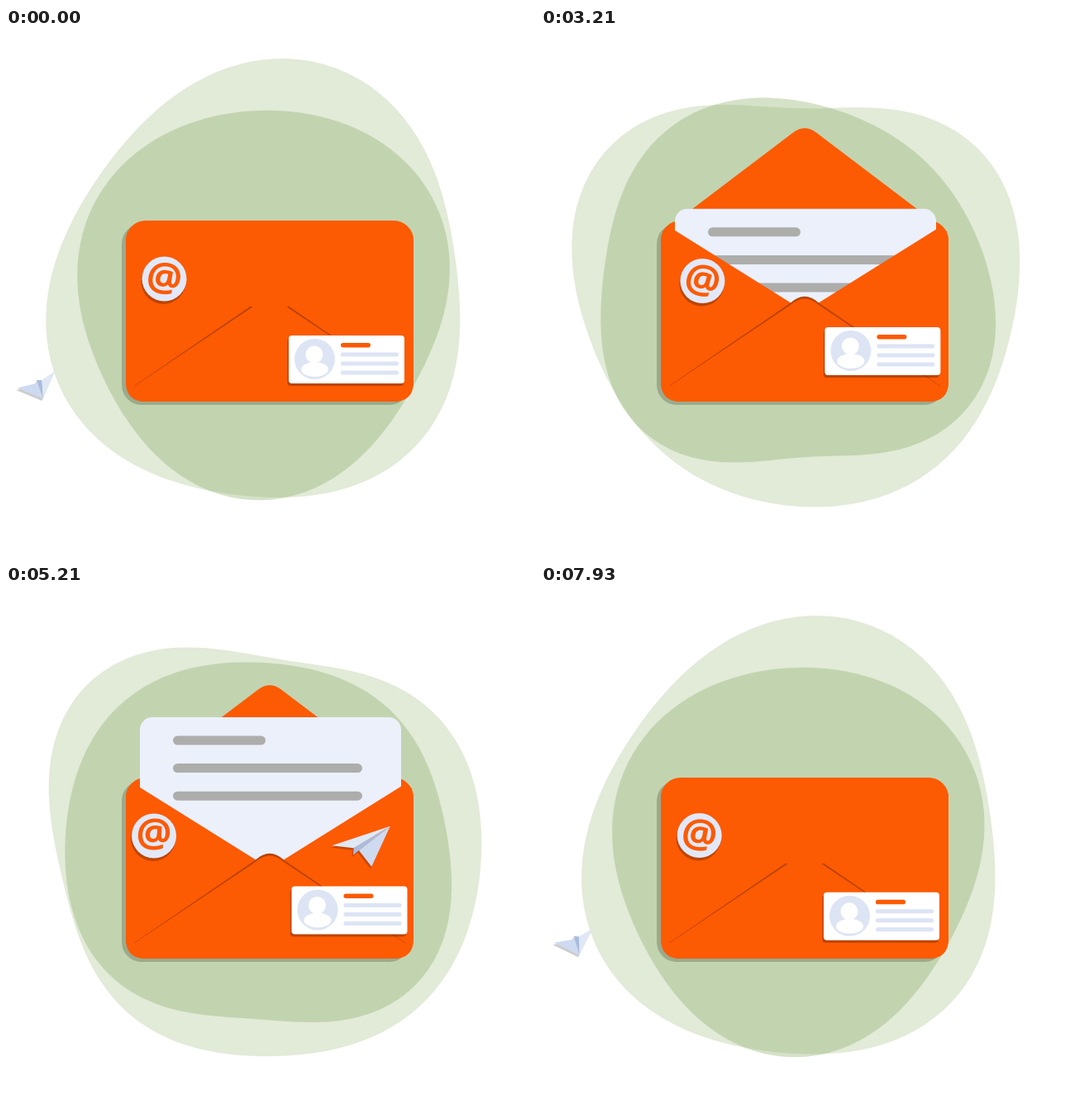
Animation, 640 px wide and 640 px high, one loop 8 s. Source, as an HTML page with a canvas:

```html
<!DOCTYPE html>
<html lang="en">
<head>
<meta charset="utf-8">
<title>Envelope</title>
<style>
  html, body { margin: 0; width: 100%; height: 100%; overflow: hidden; background: #fff; }
  canvas { display: block; }
</style>
</head>
<body>
<canvas id="stage" width="640" height="640"></canvas>
<script>
const g = document.getElementById('stage').getContext('2d');
const ORANGE = '#fc5a03', FOLD = '#b94305', PALE = '#dde4f4';
const SHADE = 'rgba(0,0,0,.25)';
const TURN = 2 * Math.PI, LOOP = 8000, LAP = LOOP / 2;

const clamp = v => Math.min(1, Math.max(0, v));
const ease = (t, from, to) => { const p = clamp((t - from) / (to - from)); return p * p * (3 - 2 * p); };
const mix = (a, b, p) => a + (b - a) * p;

// Smooth periodic path through keys of the form [time, ...values].
function spline(keys, t, period) {
  const n = keys.length;
  const key = k => keys[(k + n) % n];
  const at = k => key(k)[0] + Math.floor(k / n) * period;
  let i = n - 1;
  while (i > 0 && at(i) > t) i--;
  const d = at(i + 1) - at(i), p = (t - at(i)) / d, q = 1 - p;
  return key(i).map((v, k) => {
    const end = key(i + 1)[k];
    const m0 = (end - key(i - 1)[k]) / (at(i + 1) - at(i - 1)) * d;
    const m1 = (key(i + 2)[k] - v) / (at(i + 2) - at(i)) * d;
    return v * (1 + 2 * p) * q * q + m0 * p * q * q + end * p * p * (3 - 2 * p) - m1 * p * p * q;
  }).slice(1);
}

// Each wave: order, angle offset in quarter turns, rest height, cosine and sine swing over the loop.
const outer = [
  [0, 0, 259.5, -1.5, 1.5], [1, 0, 0, -2, 0], [1, 1, -1.5, -4, 2],
  [2, 0, 3, -11, 2], [2, 1, 2.3, -8, -5], [3, 0, -2.5, -6, -7], [3, 1, -2.5, 14, -2],
  [4, 0, -5.5, 4, 2]
];
const inner = [
  [0, 0, 231, -2.5, 1], [1, 0, -3, 3.5, -1], [1, 1, -0.5, 5.5, 0],
  [2, 0, 3, -9, 0], [2, 1, 2.3, -5, -2], [3, 0, 2, -1.5, 6], [3, 1, 1, -11.5, 1.5],
  [4, 0, -3.7, 5, 1]
];

// Time; badge x, y, tilt in degrees; card x, y.
const drift = [
  [0, 191.5, 303.5, 7, 412, 401],
  [1210, 203.5, 308.5, 13, 413.5, 394],
  [2430, 198, 305.5, 5, 419, 391],
  [3930, 192, 306.5, 19, 408.5, 391.5],
  [5210, 179, 303.5, 0, 415.5, 393.5],
  [6860, 204, 292.5, 23, 411.5, 391]
];

// Time; x, y; heading in degrees on top of one steady turn per lap; visible length.
const flight = [
  [0, 41, 431, 68, 0.42],
  [360, 53, 478, 60, 0.6],
  [850, 250, 405, 60, 0.9],
  [1210, 430, 316, 70, 1],
  [2010, 576, 115, 90, 0.85],
  [2430, 523, 223, 22, 0.8],
  [3000, 360, 300, 30, 0.75],
  [3700, 78, 396, 55, 0.5],
  [3930, 43.5, 430, 64, 0.42]
];

function fill(color, path) {
  g.fillStyle = color;
  g.fill(path);
}

function poly(...pts) {
  const p = new Path2D();
  pts.forEach(([x, y]) => p.lineTo(x, y));
  p.closePath();
  return p;
}

function box(x, y, w, h, r) {
  const p = new Path2D();
  p.roundRect(x, y, w, h, r);
  return p;
}

function oval(x, y, rx, ry = rx) {
  const p = new Path2D();
  p.ellipse(x, y, rx, ry, 0, 0, TURN);
  return p;
}

function blob(waves, t, alpha) {
  const c = Math.cos(TURN * t / LOOP), s = Math.sin(TURN * t / LOOP);
  const pts = Array.from({ length: 120 }, (_, i) => {
    const a = TURN * i / 120;
    const r = waves.reduce((sum, [order, quarter, rest, cosine, sine]) =>
      sum + (rest + cosine * c + sine * s) * Math.cos(order * a - quarter * TURN / 4), 0);
    return [310 + r * Math.cos(a), 320 + r * Math.sin(a)];
  });
  fill(`rgba(140,174,104,${alpha})`, poly(...pts));
}

function flap(tip) {
  const y = mix(247, tip, 0.92);
  fill(ORANGE, new Path2D(`M146 247L305 ${y}Q319 ${tip} 333 ${y}L492 247Z`));
}

function letter(t, rise) {
  const y = mix(255, 160, rise);
  fill('#ebf0fb', box(162, y, 316, 195, [15, 15, 0, 0]));
  for (let i = 0; i < 5; i++) {
    const grow = clamp((t - 640 - i * 190) / 190);
    if (grow) fill('#adadab', box(202, y + 22.5 + i * 33.6, 11 + grow * (i ? 218 : 101), 11, 5.5));
  }
}

function pocket() {
  fill(ORANGE, new Path2D('M145 257Q145 246 155 240.500L319 343L483 240.500Q493 246 493 257V428Q493 452 469 452H169Q145 452 145 428Z'));
  fill(FOLD, new Path2D('M155 433L302 332.500Q319 317 336 332.500L483 433Z'));
  fill(ORANGE, new Path2D('M155 433.500L302 335Q319 320 336 335L483 433.500Z'));
}

function badge(x, y, tilt) {
  fill(SHADE, oval(x - 1, y + 3.5, 27));
  fill('#e2e8f7', oval(x, y, 27));
  g.save();
  g.translate(x, y);
  g.rotate(tilt * TURN / 360);
  g.font = '700 48px "Open Sans", "Noto Sans", sans-serif';
  g.textAlign = 'center';
  g.fillStyle = ORANGE;
  g.fillText('@', 0, 15);
  g.restore();
}

function card(x, y) {
  g.save();
  g.translate(x - 70, y - 29);
  fill(SHADE, box(-1.5, 3, 140, 58, 4));
  fill('#fff', box(0, 0, 140, 58, 4));
  fill(PALE, oval(31.5, 28.5, 24.5));
  fill('#fff', oval(31, 23, 10.5));
  fill('#fff', oval(31.5, 41, 16.5, 9));
  fill(ORANGE, box(63, 9, 36, 5.5, 2.7));
  for (let i = 0; i < 3; i++) fill(PALE, box(63, 20.5 + i * 11, 70, 5, 2));
  g.restore();
}

function plane(t) {
  const [x, y, lean, length] = spline(flight, t, LAP);
  const heading = lean * TURN / 360 - TURN * t / LAP;
  const bank = 12 * Math.cos(TURN * (t - 900) / LAP);
  const c = Math.cos(heading), s = Math.sin(heading);
  const place = (u, v) => [u * length * c - v * s, u * length * s + v * c];
  const nose = place(42, 3), keel = place(-15, 2);
  const left = place(-17 - bank, -23), right = place(-17 + bank, 27);
  const a = place(-9, -4), b = place(-6, 2);
  g.save();
  g.translate(x - 1.5, y + 2.5);
  fill('rgba(0,0,0,.2)', poly(nose, left, a, keel, b, right));
  g.translate(1.5, -2.5);
  fill('#a9bce0', poly(nose, a, keel, b));
  fill('#e0e8f5', poly(nose, left, a));
  fill('#cedaf0', poly(nose, b, right));
  g.restore();
}

function draw(now) {
  const t = now % LOOP, s = t % LAP;
  const open = ease(s, 100, 400) - ease(s, 3350, 3700);
  const rise = ease(s, 300, 700) - ease(s, 2950, 3400);
  const tip = mix(350, 116, open);
  const behind = s > 2250 && s < 3750;
  const [badgeX, badgeY, tilt, cardX, cardY] = spline(drift, t, LOOP);

  g.clearRect(0, 0, 640, 640);
  blob(outer, t, 0.255);
  blob(inner, t, 0.36);
  if (behind) plane(s);
  fill('rgba(0,0,0,.2)', box(140, 237, 348, 219, 24));
  fill(ORANGE, box(145, 233, 348, 219, 24));
  if (tip < 247) flap(tip);
  if (rise > 0) letter(s, rise);
  pocket();
  if (tip >= 247) flap(tip);
  badge(badgeX, badgeY, tilt);
  card(cardX, cardY);
  if (!behind) plane(s);
}

const start = performance.now();
function tick() {
  draw(performance.now() - start);
  requestAnimationFrame(tick);
}
tick();
</script>
</body>
</html>
```
